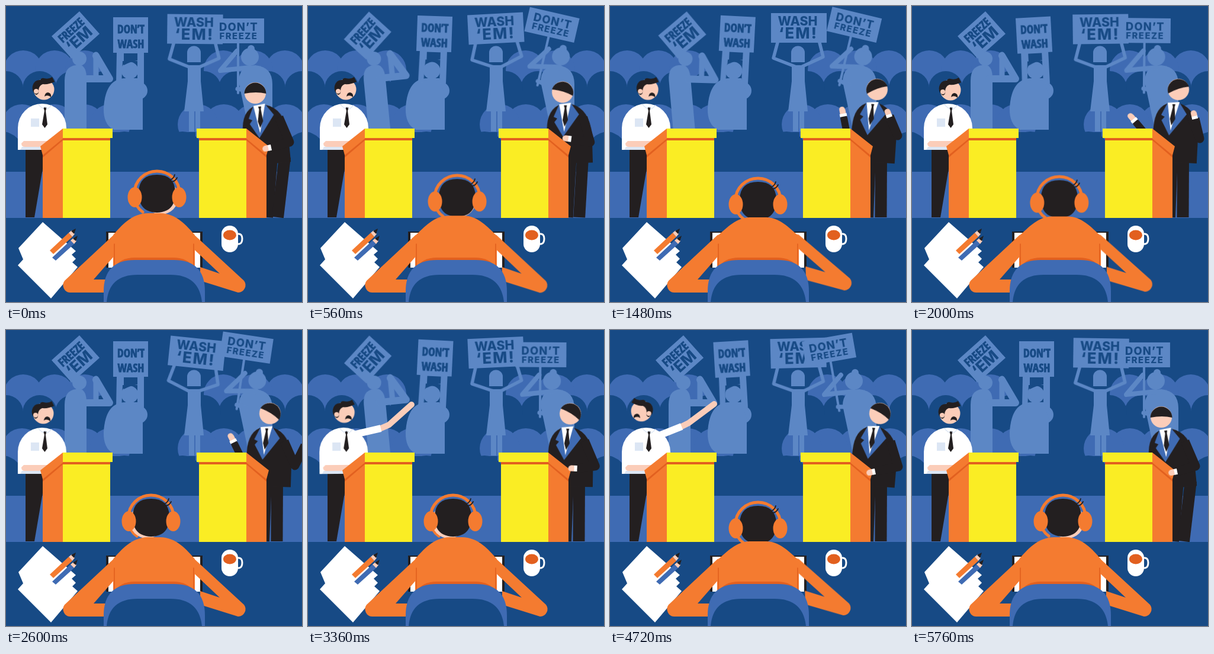
Animation of 500 by 500 pixels, one loop 5800 ms. Source, as an HTML page:

```html
<!DOCTYPE html>
<html lang="en">
<head>
<meta charset="utf-8">
<title>Debate</title>
<style>
html, body { margin: 0; width: 100%; height: 100%; overflow: hidden; background: #174a85; }
svg { display: block; width: 100vw; height: 100vh; }

.dark { fill: #174a85; }
.mid { fill: #3f6bb3; }
.light { fill: #5c87c5; }
.orange { fill: #f47b30; }
.rust { fill: #e2601f; }
.yellow { fill: #faed24; }
.black { fill: #231f20; }
.white { fill: #fff; }
.skin { fill: #fbcdb9; }
.shade { fill: #dce6f4; }
.line { fill: none; stroke-linecap: round; stroke-linejoin: round; }
.butt { stroke-linecap: butt; }
.lightLine { stroke: #5c87c5; }
.blackLine { stroke: #231f20; }
.skinLine { stroke: #fbcdb9; }
.whiteLine { stroke: #fff; }
.orangeLine { stroke: #f47b30; }

text { fill: #174a85; text-anchor: middle; font-weight: 800; font-family: Inter, "Open Sans", sans-serif; }
.narrow { font-family: "Open Sans Condensed", "Roboto Condensed", "Liberation Sans Narrow", "Open Sans", sans-serif; font-weight: 800; font-stretch: 75%; stroke: #174a85; stroke-width: .8; }

.move { animation: 5.8s ease-in-out infinite; }

/* crowd */
#freezer { animation-name: freezer; animation-duration: 2.9s; transform-origin: 118px 210px; }
@keyframes freezer {
  0%, 63%, 100% { transform: rotate(0deg); }
  18%, 38% { transform: rotate(-6deg); }
  51% { transform: rotate(1.6deg); }
}
#freezerBody { animation-name: freezerBody; animation-duration: 2.9s; transform-origin: 118px 155px; }
@keyframes freezerBody {
  0%, 63%, 100% { transform: translateX(0) skewX(0deg); }
  18%, 38% { transform: translateX(-2px) skewX(5.5deg); }
  51% { transform: translateX(3px) skewX(5deg); }
}
#washSign { animation-name: washSign; animation-duration: 2.9s; transform-origin: 209px 132px; }
@keyframes washSign {
  0%, 90%, 100% { transform: none; }
  13% { transform: translateY(-2px) rotate(3deg); }
  37% { transform: translateY(-3px) rotate(-3.5deg); }
  51% { transform: translateY(-2px) rotate(3deg); }
  63% { transform: translateY(0) rotate(-3.4deg); }
}
#emSign { animation-name: emSign; animation-duration: 2.9s; transform-origin: 318px 72px; }
@keyframes emSign {
  0%, 100% { transform: rotate(.6deg); }
  20% { transform: translateY(-1px) rotate(-3deg); }
  38%, 51% { transform: translateY(-2px) rotate(0deg); }
  63% { transform: rotate(-1.5deg); }
  90% { transform: rotate(6deg); }
}
#pole { animation-name: pole; transform-origin: 389px 145px; }
@keyframes pole {
  0%, 18.6%, 36%, 59%, 100% { transform: translate(0, 0) rotate(0deg); }
  8.5%, 25.5%, 49%, 69% { transform: translate(-4px, -14px) rotate(13.3deg); }
  44.8% { transform: translate(-2px, -14px) rotate(8.5deg); }
  81.4% { transform: translate(-5px, -10px) rotate(-10deg); }
}
#poleMan { animation-name: poleMan; transform-origin: 425px 205px; }
@keyframes poleMan {
  0%, 18.6%, 36%, 59%, 81.4%, 100% { transform: rotate(0deg); }
  8.5%, 25.5%, 69% { transform: rotate(7.5deg); }
  44.8%, 49% { transform: rotate(6deg); }
}

/* speaker on the right */
#torso { animation-name: torso; transform-origin: 462px 262px; }
@keyframes torso {
  0%, 100% { transform: rotate(-5.5deg); }
  18.6%, 44.8% { transform: rotate(1.8deg); }
  25.5% { transform: rotate(3.8deg); }
  69% { transform: rotate(0deg); }
  81.4% { transform: rotate(4.8deg); }
}
#head { animation-name: head; }
@keyframes head {
  0%, 100% { transform: translate(421px, 147px) rotate(0deg); }
  18.6% { transform: translate(438px, 144px) rotate(32deg); }
  25.5% { transform: translate(451px, 141px) rotate(-20deg); }
  36% { transform: translate(450px, 141px) rotate(-18deg); }
  44.8% { transform: translate(446px, 141px) rotate(32deg); }
  69% { transform: translate(441px, 142px) rotate(32deg); }
  81.4% { transform: translate(456px, 141px) rotate(32deg); }
}
#nearLeg { animation-name: nearLeg; }
@keyframes nearLeg {
  0%, 100% { d: path("M471 255L459 357"); }
  18.6%, 81.4% { d: path("M458 255L457.5 357"); }
}
#farLeg { animation-name: farLeg; }
@keyframes farLeg {
  0%, 100% { d: path("M450 255L442 357"); }
  18.6%, 81.4% { d: path("M440 255L436 357"); }
}
#foreArm { animation-name: foreArm; transform-origin: 402px 225px; }
@keyframes foreArm {
  0%, 5%, 62%, 100% { transform: rotate(-125deg); }
  18.6% { transform: rotate(-52deg); }
  25.5% { transform: rotate(-11deg); }
  35% { transform: rotate(-40deg); }
  44.8% { transform: rotate(-26deg); }
}
#arm { animation-name: arm; }
@keyframes arm {
  0%, 100% { d: path("M461 188L479 230L447 239"); }
  18.6% { d: path("M468 188L475 230L441 212"); }
  25.5% { d: path("M472 186L486 219L472 187"); }
  35% { d: path("M472 188L486 224L478 190"); }
  44.8% { d: path("M470 188L488 229L505 195"); }
  62%, 69% { d: path("M467 187L485 230L447 239"); }
  81.4% { d: path("M474 188L487 231L447 239"); }
}
#hand { animation-name: hand; }
@keyframes hand {
  0%, 100% { transform: translate(447px, 239px) rotate(-12deg); }
  18.6% { transform: translate(441px, 212px) rotate(25deg); }
  25.5% { transform: translate(472px, 187px) rotate(70deg); }
  35% { transform: translate(478px, 190px) rotate(77deg); }
  44.8% { transform: translate(505px, 195px) rotate(117deg); }
  62%, 69%, 81.4% { transform: translate(447px, 239px) rotate(-12deg); }
}

/* speaker on the left */
#nod { animation-name: nod; }
@keyframes nod {
  0%, 22%, 100% { transform: translate(64px, 141px); }
  34% { transform: translate(65px, 142px); }
  44.8% { transform: translate(63px, 141px) rotate(1deg); }
  69% { transform: translate(60px, 138px) rotate(-4deg); }
  81.4%, 88% { transform: translate(53px, 137px) rotate(5deg); }
}
#face { animation-name: face; animation-timing-function: step-end; }
@keyframes face {
  0%, 93% { transform: none; }
  76% { transform: scaleX(-1); }
}
#sleeve { animation-name: sleeve; }
@keyframes sleeve {
  0%, 46%, 97%, 100% { d: path("M78 184L90 222"); }
  57% { d: path("M76 177L123 166"); }
  69% { d: path("M74 177L122 170"); }
  81.4%, 87% { d: path("M76 181L121 163"); }
}
#point { animation-name: point; }
@keyframes point {
  0%, 46%, 97%, 100% { d: path("M90 222L92 234L95 246"); }
  57% { d: path("M123 166L137 160L175 126"); }
  69% { d: path("M122 170L136 167L168 126"); }
  81.4%, 87% { d: path("M121 163L133 157L176 125"); }
}
#shirt { animation-name: shirt; transform-origin: 50px 300px; }
@keyframes shirt {
  0%, 42%, 69%, 82%, 100% { transform: rotate(0deg); }
  55%, 76% { transform: rotate(-.5deg); }
}

/* moderator */
#listen { animation-name: listen; }
@keyframes listen {
  0%, 3%, 97%, 100% { transform: translate(255px, 316px); }
  15%, 31%, 80%, 85% { transform: translate(250px, 328px); }
  41.5%, 69.5% { transform: translate(245px, 316px); }
}
#cheek { animation-name: cheek; }
@keyframes cheek {
  0%, 3%, 97%, 100% { transform: translate(7px, 4px); }
  15%, 31%, 80%, 85% { transform: none; }
  41.5%, 69.5% { transform: translate(-7px, 4px); }
}
#back { animation-name: back; }
@keyframes back {
  0%, 3%, 41.5%, 69.5%, 97%, 100% { d: path("M181 450V387C194 372 212 350 240 350H260C288 350 306 372 319 387V450z"); }
  15%, 31%, 80%, 85% { d: path("M181 450V389C198 374 214 357 236 357H264C286 357 302 374 319 389V450z"); }
}
#elbow { animation-name: elbow; transform-origin: 300px 380px; }
@keyframes elbow {
  0%, 41.5%, 69.5%, 100% { transform: rotate(0deg); }
  18.6% { transform: rotate(.4deg); }
  25.5% { transform: rotate(-2.2deg); }
  81.4% { transform: rotate(-1.2deg); }
}
</style>
</head>
<body>
<svg viewBox="0 0 500 500" preserveAspectRatio="none">
  <defs>
    <g id="bushes">
      <g class="mid"><circle cx="29" cy="108" r="33"/><circle cx="82" cy="108" r="33"/><circle cx="133" cy="108" r="33"/></g>
      <g class="dark"><circle cx="0" cy="139" r="29"/><circle cx="57" cy="139" r="29"/><circle cx="112" cy="139" r="29"/><circle cx="166" cy="139" r="29"/><path d="M0 143H195V200H0z"/></g>
      <g class="mid"><circle cx="27" cy="200" r="34"/><circle cx="82" cy="200" r="34"/><circle cx="132" cy="200" r="34"/><circle cx="176" cy="200" r="34"/><path d="M0 195H176V260H0z"/></g>
    </g>
    <g id="stand">
      <path class="yellow" d="M95 222H176V358H95z"/>
      <path class="orange" d="M62 248L96 222V358H62z"/>
      <path class="rust" d="M96 223H176V227H96L62 256V251z"/>
      <path class="yellow" d="M96 207H180V223H96z"/>
      <path class="orange" d="M96 207V224L62 252L58 237z"/>
    </g>
  </defs>

  <rect class="dark" width="500" height="500"/>
  <use href="#bushes"/>
  <use href="#bushes" transform="matrix(-1 0 0 1 500 0)"/>

  <path id="freezerBody" class="move light" d="M99 209V126Q99 102 118 100H127Q136 104 136 122V209z"/>
  <g id="freezer" class="move">
    <circle class="light" cx="124" cy="89" r="12"/>
    <path class="line lightLine" stroke-width="12" d="M130 123H175L152 84"/>
    <path class="line lightLine" stroke-width="9" d="M152 82V122"/>
    <path class="light" d="M77 51L124 9L158 47L111 89z"/>
    <g transform="translate(117.5 49) rotate(-42)">
      <text class="narrow" data-w="51" y="-4">FREEZE</text>
      <text data-w="49" y="18">‘EM</text>
    </g>
  </g>

  <g class="light">
    <circle cx="209" cy="109" r="14.5"/>
    <circle cx="224" cy="143" r="15"/>
    <path d="M182 209Q164 200 165 172Q168 122 202 122H222L231 150V209z"/>
  </g>
  <g id="washSign" class="move">
    <path class="light" d="M181 19H240V79H233V132H222V93H197L195 132H186L187 79H181z"/>
    <path class="dark" d="M199 80H222V92Q210 94 199 100z"/>
    <text class="narrow" data-w="46" x="211" y="45.5">DON’T</text>
    <text class="narrow" data-w="45" x="211" y="70.5">WASH</text>
  </g>

  <g class="light">
    <path d="M306 95V79A11.5 11.5 0 0 1 329 79V95z"/>
    <path d="M307 100H329V127L334 178H301L307 127z"/>
    <path d="M309 176H318V212H309zM320 176H328V212H320z"/>
  </g>
  <g id="emSign" class="move">
    <path class="line lightLine" stroke-width="5.5" d="M283 64L276 90L312 104M354 64L360 88L325 104"/>
    <path class="light" d="M272 14H366V64H272z"/>
    <text data-w="67" x="317" y="35">WASH</text>
    <text data-w="66" x="318" y="57" letter-spacing=".08em">‘EM!</text>
  </g>

  <path class="light" d="M393 128Q393 101 421 100Q450 103 450 132V208H410Z"/>
  <g id="poleMan" class="move">
    <circle class="light" cx="412" cy="86" r="15"/>
    <circle class="light" cx="414" cy="72" r="6"/>
    <path class="line lightLine" stroke-width="8" d="M412 104L362 109L390 76"/>
  </g>
  <g id="pole" class="move">
    <path class="line lightLine" stroke-width="4" d="M392 62V147"/>
    <path class="line lightLine" stroke-width="7" d="M391 140L408 143"/>
    <path class="light" d="M350 21H436V63H350z"/>
    <text data-w="66" x="393" y="42" letter-spacing=".06em">DON’T</text>
    <text data-w="65" x="393" y="56" letter-spacing=".1em">FREEZE</text>
  </g>

  <g class="dark">
    <circle cx="-8" cy="250" r="38"/><circle cx="56" cy="242" r="34"/><circle cx="200" cy="247" r="35"/>
    <circle cx="298" cy="247" r="35"/><circle cx="444" cy="242" r="34"/><circle cx="508" cy="250" r="38"/>
    <path d="M0 243H500V282H0zM180 213H320V282H180z"/>
  </g>
  <path class="mid" d="M0 280H500V358H0z"/>

  <!-- left speaker -->
  <path class="black" d="M33 240H62V275L48 357H33z"/>
  <path id="point" class="move line skinLine" stroke-width="10" d="M90 222L92 234L95 246"/>
  <path id="sleeve" class="move line butt whiteLine" stroke-width="12" d="M78 184L90 222"/>
  <g id="shirt" class="move">
    <path class="white" d="M20 243V206A41 41 0 0 1 102 206V243z"/>
    <path class="shade" d="M42 190H56V204H42zM27 238H62V243H24z"/>
    <path class="skin" d="M30 228H72V238H32Q26 238 26 232z"/>
    <path class="black" d="M63 171H69L67 177L70 200L65.500 206L61 200L65 177z"/>
    <path class="line" stroke="#dce6f4" stroke-width="1.2" d="M55 167L62 173L66 170L70 174L77 168"/>
  </g>
  <g id="nod" class="move"><g id="face" class="move">
    <circle class="skin" r="17.5"/>
    <path class="black" d="M-9 2Q-9 -6 -2 -9Q8 -8 18 -13L14 -21Q8 -17 0 -19Q-4 -20 -6 -16Q-16 -17 -19 -6Q-21 4 -13 9Q-8 8 -9 2z"/>
    <circle class="skin" cx="-13" cy="3" r="4"/>
    <path class="black" d="M1 12Q2 5 7 5Q13 6 12 13L9 11Q4 9 1 12z"/>
  </g></g>
  <use href="#stand"/>

  <!-- right speaker -->
  <path id="farLeg" class="move line butt blackLine" stroke-width="18" d="M450 255L442 357"/>
  <path id="nearLeg" class="move line butt blackLine" stroke-width="20" d="M471 255L459 357"/>
  <g id="torso" class="move">
    <path class="black" d="M405 240V208Q406 172 430 165H447Q478 174 481 218V265H440z"/>
    <path class="mid" d="M427 165L417 186L423 189L418 195L432 220L460 183L447 164z"/>
    <path class="white" d="M427 165L447 163L434 212z"/>
    <path class="black" d="M435 167H440L439 172L441 192L435 203L432 192L436 172z"/>
  </g>
  <g id="head" class="move">
    <circle class="skin" r="18"/>
    <path class="black" d="M-18.500 1A18.500 18.500 0 0 1 18.500 1Q2 -3 -18.500 1z"/>
  </g>
  <g id="foreArm" class="move">
    <path class="line blackLine" stroke-width="12" d="M402 225V189"/>
    <path class="white" d="M396 181H408V186H396z"/>
    <path class="skin" d="M397 181V174Q397 169 402 169Q408 169 407 181z"/>
  </g>
  <use href="#stand" transform="matrix(-1 0 0 1 502 0)"/>
  <path id="arm" class="move line butt blackLine" stroke-width="15" d="M461 188L479 230L447 239"/>
  <g id="hand" class="move">
    <path class="white" d="M-4 -5H1V5H-4z"/>
    <path class="skin" d="M-4 -5H-9Q-14 -4 -14 0Q-14 5 -9 5H-4z"/>
  </g>

  <!-- desk -->
  <path class="dark" d="M0 358H500V500H0z"/>
  <path class="white" d="M62 365L118 414L111 420L118 427L112 433L121 441L76 494L20 438L29 428L21 409z"/>
  <path class="orange" d="M74 413L106 383L112 390L80 419z"/>
  <path class="skin" d="M106 383L111 379L116 385L112 390z"/>
  <path class="black" d="M110 380L118 376L115 385z"/>
  <path class="mid" d="M78 425L109 396L115 402L84 430z"/>
  <path class="skin" d="M109 396L114 392L119 397L115 402z"/>
  <path class="black" d="M113 393L121 388L118 397z"/>
  <rect class="white" x="364" y="371" width="28" height="45" rx="14"/>
  <ellipse class="rust" cx="378" cy="387" rx="11" ry="8.500"/>
  <path class="line whiteLine" stroke-width="3" d="M390 385H394Q399 386 399 393Q399 401 394 402H390"/>
  <path class="black" d="M169 381H332V442H169z"/>
  <path class="white" d="M173 383H328V442H173z"/>

  <!-- moderator -->
  <path class="orange" d="M215 380L181.500 387L99 464A12.500 12.500 0 0 0 108 484H169L171 462H148L183 422z"/>
  <path id="elbow" class="move orange" d="M285 380L318.500 387L402 464A12.500 12.500 0 0 1 392 484L328 464V441L361 452L308 402z"/>
  <g id="listen" class="move">
    <path class="line" stroke="#3f6bb3" stroke-width="3" d="M-34 0A34 34 0 0 1 34 0"/>
    <path class="line orangeLine" stroke-width="5" d="M-38 4V0A37 36 0 0 1 38 0V4M-38 8Q-36 24 -24 32"/>
    <circle id="cheek" class="move skin" cy="3" r="29"/>
    <path class="black" d="M-31 -2Q-30 -31 0 -31Q30 -31 31 -2Q31 22 17 29Q0 37 -17 29Q-31 22 -31 -2z"/>
    <path class="line blackLine" stroke-width="1.8" d="M22 -22Q28 -24 30 -31M25 -19Q31 -20 34 -26"/>
    <ellipse class="orange" cx="-37.500" cy="7" rx="12" ry="17"/>
    <ellipse class="orange" cx="37.500" cy="7" rx="12" ry="17"/>
  </g>
  <path id="back" class="move orange" d="M181 450V387C194 372 212 350 240 350H260C288 350 306 372 319 387V450z"/>
  <path class="line" stroke="#e2601f" stroke-width="1.6" d="M183 402V445M317 402V445"/>
  <path class="rust" d="M183 443Q192 425 218 425H282Q306 425 317 441V450H183z"/>
  <path class="mid" d="M165 500V482Q165 429 218 429H283Q336 429 336 482V500z"/>
  <path class="dark" d="M170 500Q174 454 222 454H278Q326 454 331 500z"/>
</svg>
<script>
// Choose each font size so the lettering spans its sign.
for (const label of document.querySelectorAll("text")) {
  label.style.fontSize = "20px";
  label.style.fontSize = 20 * label.dataset.w / label.getComputedTextLength() + "px";
}
</script>
</body>
</html>
```
